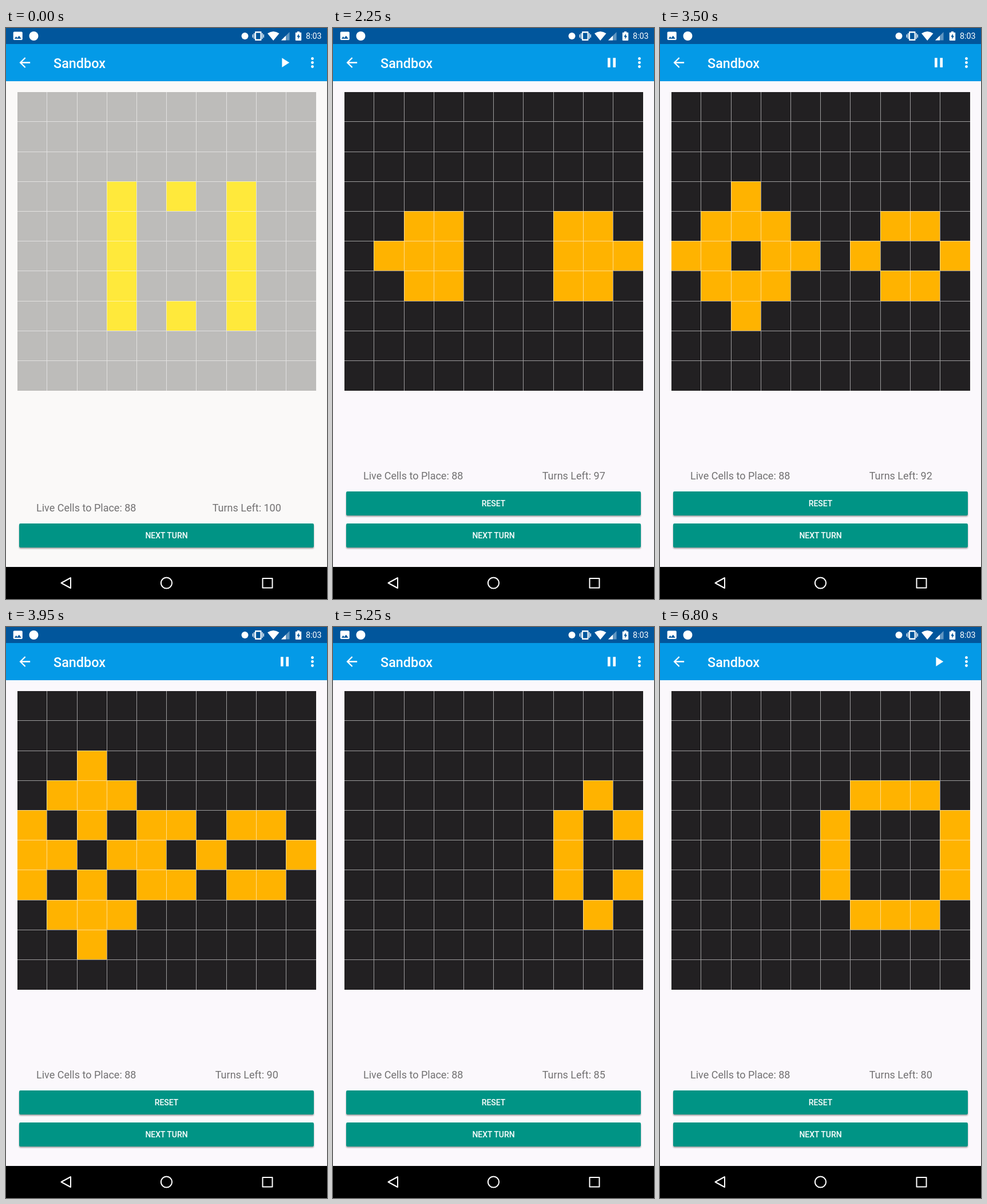
Write an HTML page that moves like this. It is 561 by 998 pixels and loops after 8150 ms.

```html
<!DOCTYPE html>
<html lang="en">
<head>
<meta charset="utf-8">
<title>Sandbox</title>
<style>
html, body { margin: 0; width: 100%; height: 100%; overflow: hidden; background: #faf8fa; }
svg { display: block; width: 561px; height: 998px; font-family: Roboto, sans-serif; }
.crisp { shape-rendering: crispEdges; }
.title { font-size: 23.4px; font-weight: 500; }
.clock { font-size: 14.3px; }
.info { font-size: 18px; fill: #727172; text-anchor: middle; }
.button rect { fill: #009485; filter: drop-shadow(0 2px 1.3px rgba(0, 0, 0, .36)); }
.button text { font-size: 14px; font-weight: 500; fill: #fff; text-anchor: middle; }
</style>
</head>
<body>
<svg viewBox="0 0 561 998">
  <rect id="page" width="561" height="998"/>
  <rect width="561" height="28" fill="#01569c"/>
  <rect y="28" width="561" height="65" fill="#049ae7"/>

  <g fill="#fff">
    <path fill-rule="evenodd" d="M14.500 6.500h12.500q1.800 0 1.800 1.800v11q0 1.800-1.800 1.800h-12.500q-1.800 0-1.800-1.800v-11q0-1.800 1.800-1.800zM14.800 18.800h12l-4-5.400-3 4-2.100-2.600z"/>
    <circle cx="48.500" cy="14" r="8"/>
    <circle cx="417.500" cy="14" r="6"/>
    <path fill-rule="evenodd" d="M436 6h9.500q1 0 1 1v14q0 1-1 1h-9.500q-1 0-1-1v-14q0-1 1-1zM437 8.500v11h7.500v-11zM433 9h1.400v10h-1.400zM447.200 9h1.400v10h-1.400zM430.600 11.300h1.400v5.400h-1.400zM449.600 11.300h1.400v5.400h-1.400z"/>
    <path d="M457 9.600Q467.200 2.200 477.500 9.600L467.200 22z"/>
    <path d="M481 21.500L495.500 7v14.500z" opacity=".38"/>
    <path d="M481 21.500L489 13.500v8z"/>
    <path fill-rule="evenodd" d="M509 6h4v1.700h2.200q1 0 1 1v12.300q0 1-1 1h-8.400q-1 0-1-1v-12.300q0-1 1-1h2.200zM511.800 10l-3.500 5.500h2.200v4l3.500-5.800h-2.200z"/>
    <text class="clock" x="524" y="19">8:03</text>
    <path transform="translate(18.800 46.500) scale(1.1685)" d="M20 11H7.830l5.590-5.590L12 4l-8 8 8 8 1.410-1.410L7.830 13H20z"/>
    <text class="title" x="83" y="69.500">Sandbox</text>
    <circle id="ripple" cx="487" cy="61"/>
    <path id="mode" transform="translate(473 46.500) scale(1.1685)"/>
    <circle cx="535.500" cy="53.500" r="2.400"/>
    <circle cx="535.500" cy="60.500" r="2.400"/>
    <circle cx="535.500" cy="67.500" r="2.400"/>
  </g>

  <g id="cells" class="crisp"></g>
  <path id="lines" class="crisp" fill="#fff" opacity=".56"/>

  <g id="info" class="info">
    <text x="140.250" y="844.500">Live Cells to Place: 88</text>
    <text id="turns" x="420.750" y="844.500"></text>
  </g>
  <g id="reset" class="button">
    <rect x="23" y="810" width="515" height="42" rx="2.300"/>
    <text x="280.500" y="836">RESET</text>
  </g>
  <g class="button">
    <rect x="23" y="866" width="515" height="42" rx="2.300"/>
    <text x="280.500" y="892">NEXT TURN</text>
  </g>

  <rect y="942" width="561" height="56"/>
  <g fill="none" stroke="#fff" stroke-width="2" stroke-linejoin="round">
    <path d="M96.500 970L113 961V979z"/>
    <circle cx="280.500" cy="970" r="9.600"/>
    <rect x="448.500" y="962" width="17" height="16.500"/>
  </g>
</svg>
<script>
const LOOP = 8150, SIZE = 10, PITCH = 52.2, LEFT = 19.6, TOP = 111.6;
const RUN_START = 1700, STOP = 6550;
const TURN_TIMES = [1700, 1950, 2200, 2450, 2700, 2950, 3200, 3500, 3750, 3950,
  4250, 4500, 4750, 5000, 5250, 5450, 5750, 6000, 6250, 6500];
const PLAY = 'M8 5v14l11-7z';
const PAUSE = 'M6 19h4V5H6zM14 5v14h4V5z';

const $ = id => document.getElementById(id);
const set = (node, attrs) => {
  for (const key in attrs) node.setAttribute(key, attrs[key]);
};
const pos = (start, i) => Math.floor(start + i * PITCH);
const edge = (start, i) => i ? pos(start, i) : Math.round(start);

const seed = Array.from({ length: SIZE }, (_, row) =>
  Array.from({ length: SIZE }, (_, col) =>
    row >= 3 && row <= 7 && (col === 3 || col === 7 || (col === 5 && (row === 3 || row === 7)))));

function nextTurn(board) {
  return board.map((line, row) => line.map((alive, col) => {
    let near = 0;
    for (let r = row - 1; r <= row + 1; r++)
      for (let c = col - 1; c <= col + 1; c++)
        if ((r !== row || c !== col) && board[r]?.[c]) near++;
    return near === 3 || (alive && near === 2);
  }));
}

const boards = [seed];
TURN_TIMES.forEach(() => boards.push(nextTurn(boards.at(-1))));

const cells = seed.flatMap((line, row) => line.map((_, col) => {
  const cell = document.createElementNS($('cells').namespaceURI, 'rect');
  const x = edge(LEFT, col), y = edge(TOP, row);
  set(cell, {
    x, y,
    width: edge(LEFT, col + 1) - x + (col === SIZE - 1 ? 0.6 : 0),
    height: edge(TOP, row + 1) - y + (row === SIZE - 1 ? 0.6 : 0)
  });
  $('cells').append(cell);
  return cell;
}));

let grid = '';
for (let i = 1; i < SIZE; i++)
  grid += `M${pos(LEFT, i)} 112h1v522h-1zM20 ${pos(TOP, i)}h522v1h-522z`;
set($('lines'), { d: grid });

function draw(time) {
  const turn = TURN_TIMES.filter(at => at <= time).length;
  const started = turn > 0;
  const running = time >= RUN_START && time < STOP;
  const [live, dead] = started ? ['#ffb300', '#222022'] : ['#ffe93b', '#bdbcba'];
  boards[turn].flat().forEach((alive, i) => set(cells[i], { fill: alive ? live : dead }));

  set($('page'), { fill: time < 2250 ? '#faf9f8' : '#fbf8fc' });
  set($('mode'), { d: running ? PAUSE : PLAY });
  set($('info'), { transform: `translate(0 ${started ? -56 : 0})` });
  set($('reset'), { visibility: started ? 'visible' : 'hidden' });
  $('turns').textContent = `Turns Left: ${100 - turn}`;

  // Touch feedback when the run is paused.
  const touch = (time - 6450) / 350;
  const touched = touch >= 0 && touch < 1;
  set($('ripple'), {
    r: touched ? 12 + 8 * Math.min(1, touch * 2) : 0,
    opacity: touched ? 0.14 * (1 - touch) : 0
  });
}

let shown = -1;
function tick() {
  const time = Math.floor(performance.now() % LOOP / 50) * 50;
  if (time !== shown) draw(shown = time);
  requestAnimationFrame(tick);
}
tick();
</script>
</body>
</html>
```
